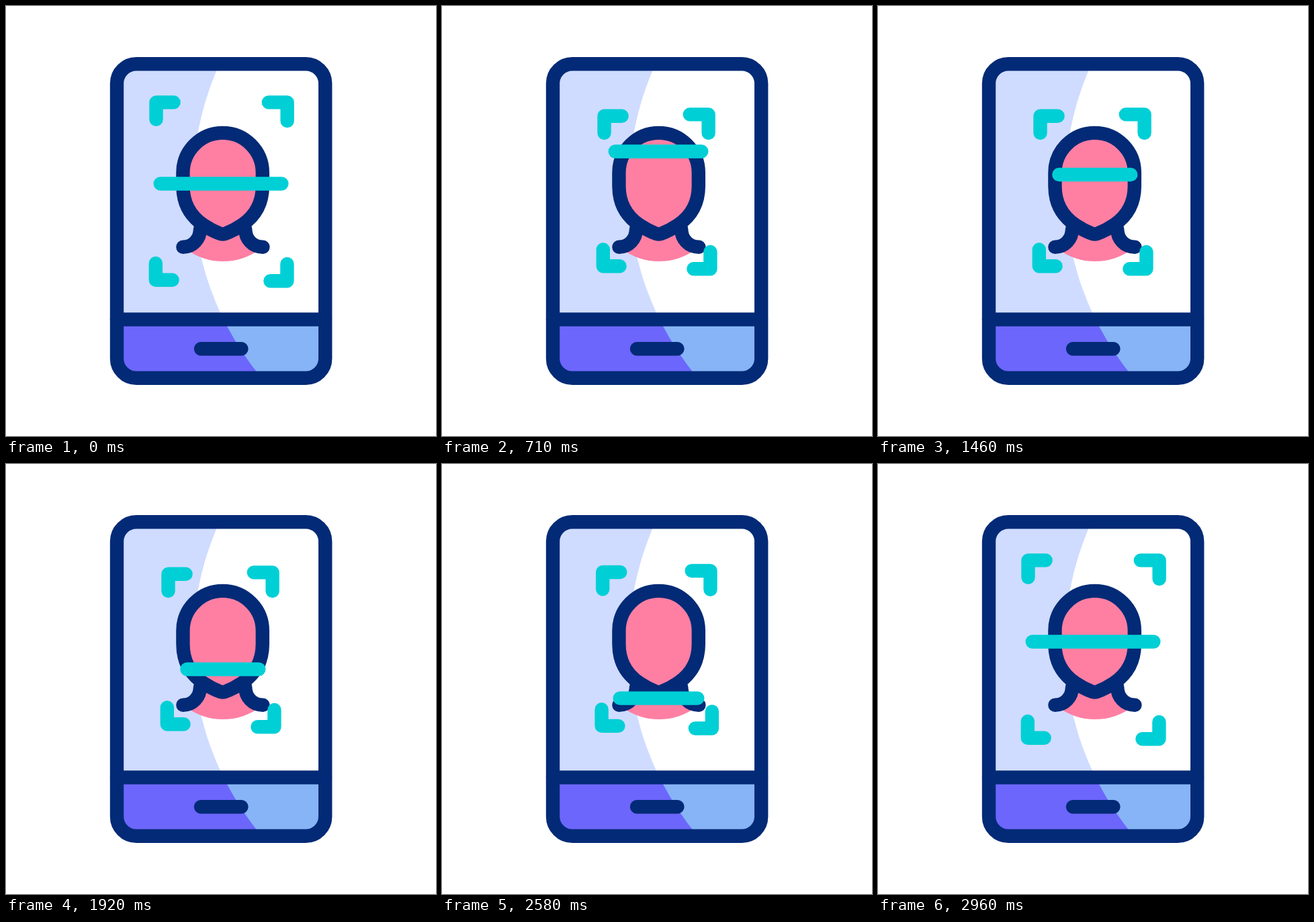
An HTML page for the animation above (3000 ms loop, 640 by 640 pixels).

```html
<!DOCTYPE html>
<html lang="en">
<head>
<meta charset="utf-8">
<title>Face scan</title>
<style>
html, body { margin: 0; width: 100%; height: 100%; overflow: hidden; background: #fff; }
svg { display: block; width: 100%; height: 100%; }
.line { fill: none; stroke-width: 20.4; stroke-linecap: round; stroke-linejoin: round; }
.navy { stroke: #032a76; }
.teal { stroke: #00cfd6; }
</style>
</head>
<body>
<svg viewBox="0 0 640 640">
  <defs>
    <clipPath id="screen"><rect x="165" y="86" width="310" height="380"/></clipPath>
    <clipPath id="panel"><rect x="165" y="466" width="310" height="88" /></clipPath>
    <clipPath id="body"><rect x="165" y="86" width="310" height="468" rx="29"/></clipPath>
  </defs>

  <g clip-path="url(#body)">
    <g clip-path="url(#screen)">
      <rect width="640" height="640" fill="#cfdcff"/>
      <circle cx="722" cy="270" r="444" fill="#fff"/>
    </g>
    <g clip-path="url(#panel)">
      <rect width="640" height="640" fill="#6c66fc"/>
      <circle cx="722" cy="270" r="444" fill="#86b4f6"/>
    </g>
  </g>
  <g class="line navy">
    <rect x="165" y="86.2" width="310.2" height="467.6" rx="29"/>
    <path d="M165 466.5H475M290 510.3H350.4"/>
  </g>

  <path fill="#ff7fa3" d="M268 362A93 93 0 0 0 378 362L350 335H296Z"/>
  <path class="line navy" style="fill:#ff7fa3" d="M263.4 248A59.2 59.2 0 0 1 381.8 248V268
    C381.8 296 369 314 351 326C343 331.5 334 336 326 339Q322.6 340 319 339
    C311 336 302 331.5 294 326C276 314 263.4 296 263.4 268Z"/>
  <path class="line navy" d="M289 332C289 347 278 358.7 263.4 358.7M356.2 332C356.2 347 367 358.7 382.4 358.7"/>

  <g class="line teal">
    <path class="corner" d="M223.5 168.7V143.4H249.6"/>
    <path class="corner" d="M390.8 143.4H418.6V171.1"/>
    <path class="corner" d="M222.8 383V407.7H247.6"/>
    <path class="corner" d="M418.4 384V409.2H393.4"/>
    <path id="bar"/>
  </g>
</svg>
<script>
const FPS = 24, LOOP = 72;
const corners = document.querySelectorAll(".corner");
const bar = document.getElementById("bar");
const inward = [[18, 20.3], [-22, 18], [17, -20.5], [-19, -18]];
const REST_Y = 264.5, TOP_Y = 196.6, LOW_Y = 360;

const mix = (a, b, k) => a + (b - a) * k;
const span = (f, from, to) => Math.min(1, Math.max(0, (f - from) / (to - from)));
const easeOut = (k, power) => 1 - Math.pow(1 - k, power);

function draw(ms) {
  const f = Math.floor(ms * FPS / 1000 + 0.1) % LOOP;

  // Corners close in, stay, then open again.
  const closed = f < 61 ? easeOut(span(f, 1, 13), 1.32)
                        : 1 - easeOut(span(f, 61, 71), 1.32);
  corners.forEach((c, i) => {
    const [dx, dy] = inward[i];
    c.setAttribute("transform", `translate(${dx * closed} ${dy * closed})`);
  });

  // Bar rises and narrows, sweeps down evenly, then returns to rest.
  const rise = Math.sin(span(f, 13, 21) * Math.PI / 2);
  const back = easeOut(span(f, 61, 71), 1.2);
  let y = mix(REST_Y, TOP_Y, rise);
  if (f >= 24) y = mix(TOP_Y, LOW_Y, span(f, 24, 57));
  if (f >= 61) y = mix(LOW_Y, REST_Y, back);
  const narrow = f < 61 ? rise : 1 - back;
  bar.setAttribute("d", `M${mix(229.7, 269.4, narrow)} ${y}H${mix(410.3, 376.2, narrow)}`);
}

let start;
function tick(now) {
  if (start === undefined) start = now;
  draw(Math.max(0, now - start) % 3000);
  requestAnimationFrame(tick);
}
draw(0);
requestAnimationFrame(tick);
</script>
</body>
</html>
```
